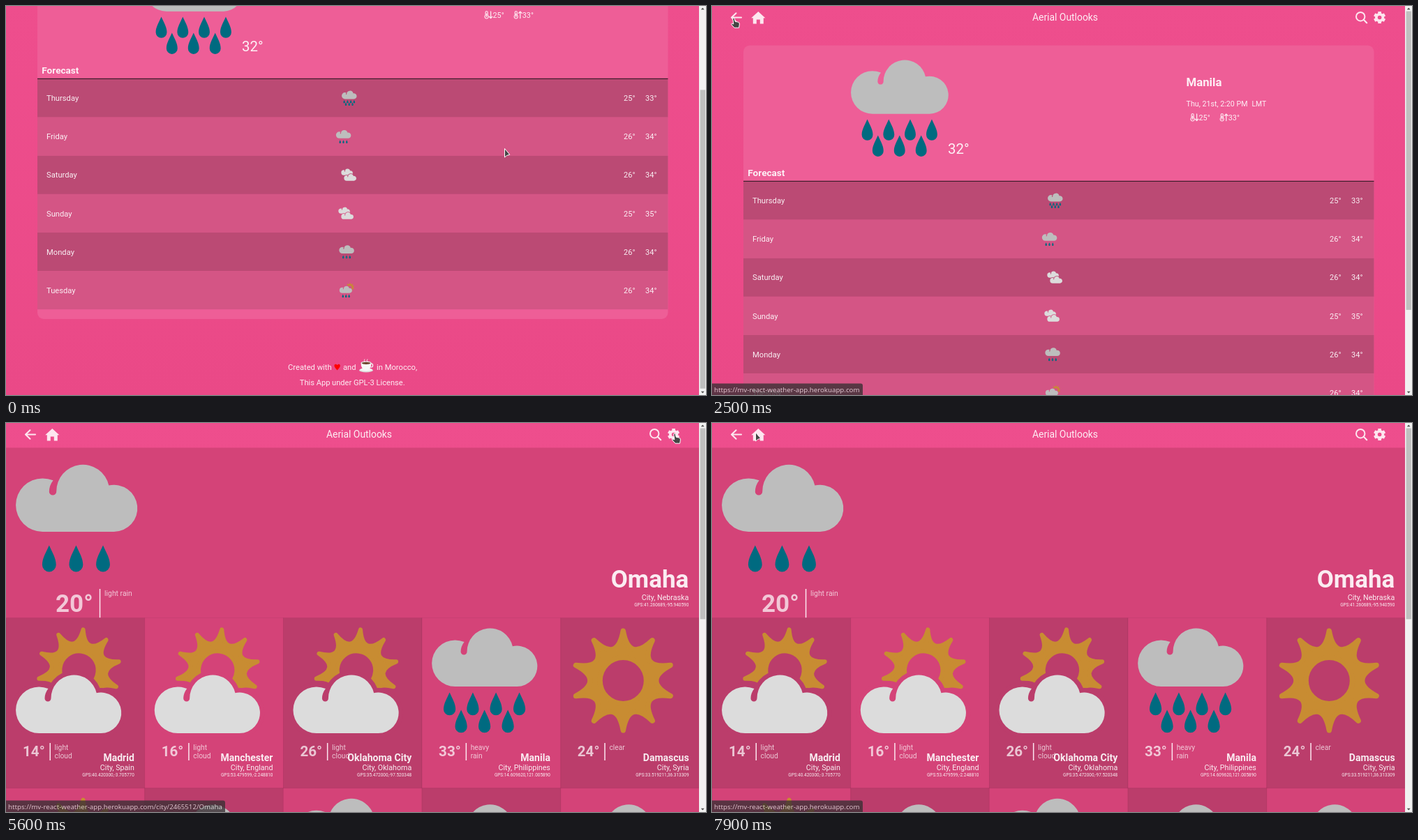
Animation of 1003 by 558 pixels, one loop 8000 ms. Source, as an HTML page:

```html
<!DOCTYPE html>
<html lang="en">
<head>
<meta charset="utf-8">
<title>Weather app</title>
<style>
  html, body { margin: 0; width: 100%; height: 100%; overflow: hidden; background: #ec4b8a; }
  svg { display: block; }
  text { font-family: Roboto, "Open Sans", sans-serif; fill: #fff; fill-opacity: .9; white-space: pre; }
  .bold { font-weight: 700; }
  .soft { fill-opacity: .7; }
  .end { text-anchor: end; }
  .mid { text-anchor: middle; }
  .url { font-family: "Noto Sans", sans-serif; fill: #f2eef0; }
  .line { fill: none; stroke: #fde6ef; stroke-linecap: round; stroke-linejoin: round; }
  .solid { fill: #fde6ef; }
  .pointer { fill: #444; stroke: #fff; stroke-width: 1; stroke-linejoin: round; }
</style>
</head>
<body>
<svg id="stage" width="1003" height="558" viewBox="0 0 1003 558"></svg>
<script>
const GREY = '#bdbdbd', LIGHT = '#dcdcdc', SUN = '#c88c32', RAIN = '#006a80';
const DARK_CELL = '#bb3d6b', LIGHT_CELL = '#d44378';
const LOOP = 8000, STEP = 100, VIEW = 558;

const text = (x, y, size, str, cls = '') =>
  `<text x="${x}" y="${y}" font-size="${size}" class="${cls}">${str}</text>`;
const rect = (x, y, w, h, fill, more = '') =>
  `<rect x="${x}" y="${y}" width="${w}" height="${h}" fill="${fill}" ${more}/>`;
const use = (id, x, y, scale = 1, more = '') =>
  `<use href="#${id}" transform="translate(${x} ${y}) scale(${scale})" ${more}/>`;
const icon = (id, x, y, size) => use(id, x, y, size / 151);

// Weather icons live in a box about 151 units wide.
// Ten rays joined by curved valleys, around a round hole.
function sunPath() {
  const at = (r, turn) => {
    const a = turn * Math.PI / 5;
    return `${(r * Math.sin(a)).toFixed(1)} ${(-r * Math.cos(a)).toFixed(1)}`;
  };
  let d = 'M' + at(71.3, 0);
  for (let i = 0; i < 10; i++) d += `Q${at(27, i + .5)} ${at(71.3, i + 1)}`;
  return d + 'ZM33.2 0A33.2 33.2 0 1 0-33.2 0A33.2 33.2 0 1 0 33.2 0Z';
}
const cloud = (x, y, scale, fill) => use('cloud', x, y, scale, `fill="${fill}"`);
const cutCloud = (x, y, scale, fill) =>
  use('cloud', x, y, scale, 'fill="currentColor" stroke="currentColor" stroke-width="13"') +
  cloud(x, y, scale, fill);
const drops = (y, xs) => xs.map(x => use('drop', x, y)).join('');
const threeDrops = drops(109, [41.5, 75, 108.5]);

const defs = `<defs>
  <path id="cloud" d="M33.3 83.5A33.25 33.25 0 0 1 33.3 17Q40 17 46.5 19.5C43 24 41.5 29 41.5 33.5A4.5 4.5 0 0 0 50.5 33.5A33 33 0 0 1 115.7 25.8A29.2 29.2 0 1 1 122 83.5Z"/>
  <path id="drop" fill="${RAIN}" d="M0 0C4 9 8.6 16 8.6 24.2A8.6 8.6 0 0 1-8.6 24.2C-8.6 16-4 9 0 0Z"/>
  <path id="star" fill="${SUN}" stroke="${SUN}" stroke-width="7.4" stroke-linejoin="round" fill-rule="evenodd" d="${sunPath()}"/>
  <g id="heavyRain">${cloud(0, 0, 1, GREY)}${drops(92, [25.5, 58.8, 92, 125.5])}${drops(117, [42, 75.5, 109])}</g>
  <g id="lightRain">${cloud(0, 8.5, 1, GREY)}${threeDrops}</g>
  <g id="clear">${use('star', 75.5, 75)}</g>
  <g id="lightCloud"><g transform="rotate(6 90.5 60)">${use('star', 90.5, 60, .82)}</g>${cutCloud(0, 67, 1, LIGHT)}</g>
  <g id="heavyCloud">${cloud(0, 12, .77, LIGHT)}${cutCloud(28, 64, .82, LIGHT)}</g>
  <g id="showers">${use('star', 106, 46, .62)}${cutCloud(0, 32, .84, GREY)}${use('drop', 35, 116)}${use('drop', 66, 116)}${use('drop', 97, 116)}</g>
  <g id="thermo"><path class="line" stroke-width="1.2" d="M2.3 6.5V2.2a1.5 1.5 0 0 1 3 0V6.5a2.6 2.6 0 1 1-3 0Z"/><path class="line" stroke-width="1.4" d="M3.8 4.5V8.5"/></g>
  <path id="arrow" class="pointer" d="M.5 .5V13L3.6 10.4 7.8 9.2Z"/>
  <path id="hand" class="pointer" d="M-1.3 .6Q0-.6 1.2 .8L2.2 5.2 6.6 6.2Q8.6 6.8 8.4 9L7.6 14.2H1L-3 9.8Q-3.8 8.2-2.2 8L-.2 9Z"/>
</defs>`;

function header() {
  const teeth = [0, 60, 120].map(a =>
    `<path stroke="#fde6ef" stroke-width="4.6" d="M0-8.5V-4.5M0 4.5V8.5" transform="rotate(${a})"/>`).join('');
  return `<path class="line" stroke-width="2.1" d="M42 16.5H28M34.5 10.3L28 16.5L34.5 22.7"/>
    <path class="solid" d="M66.3 8L76.4 17.2H73.8V25.5H68.8V19.5H63.8V25.5H58.8V17.2H56.2Z"/>
    ${text(506, 21.3, 13.9, 'Aerial Outlooks', 'mid')}
    <circle class="line" stroke-width="2" cx="929.2" cy="15.2" r="6.2"/>
    <path class="line" stroke-width="2.2" d="M933.8 19.8L938.2 24.2"/>
    <g transform="translate(956.6 16.5)"><circle r="4.7" fill="none" stroke="#fde6ef" stroke-width="3.8"/>${teeth}</g>`;
}

function forecastRow([day, id, iconX, low, high], i) {
  const top = 251.6 + i * 55.1, bg = i % 2 ? '#d45585' : '#bb4a74', base = top + 31.6;
  return `<g color="${bg}">${rect(45, top, 903.5, 55.1, bg)}
    ${text(58, base, 11.2, day)}${icon(id, iconX, top + 17, 21.5)}
    ${text(901.5, base, 11, low + '°', 'end')}${text(932.5, base, 11, high + '°', 'end')}</g>`;
}

function detailPage() {
  const rows = [
    ['Thursday', 'heavyRain', 481, 25, 33],
    ['Friday', 'lightRain', 472.8, 26, 34],
    ['Saturday', 'heavyCloud', 480.3, 26, 34],
    ['Sunday', 'heavyCloud', 476.3, 25, 35],
    ['Monday', 'lightRain', 477.3, 26, 34],
    ['Tuesday', 'showers', 477.8, 26, 34]
  ];
  const cup = `<g transform="translate(516 663.5)">
    <ellipse cy="6" rx="10" ry="3" fill="#d9d9d9"/><ellipse cy="5.2" rx="9" ry="2.2" fill="#f4f4f4"/>
    <circle cx="7" cy="-1" r="2.6" fill="none" stroke="#eee" stroke-width="1.4"/>
    <path fill="#f7f7f7" d="M-7.5-4.5H7.5Q7.5 5.5 0 5.5T-7.5-4.5Z"/>
    <ellipse cy="-4.5" rx="7.5" ry="2.4" fill="#e4e4e4"/><ellipse cy="-4.2" rx="6.2" ry="1.6" fill="#70432c"/>
    <path fill="none" stroke="#eee" stroke-width=".9" d="M-2-6q-1.5-2 0-4M2-6q-1.5-2 0-4"/></g>`;
  return header() + rect(45, 56.5, 903.5, 539.5, '#ee5e97', 'rx="9"') +
    icon('heavyRain', 199, 77.5, 139.5) + text(338, 211.6, 20.4, '32°') +
    text(679.5, 115.3, 16.8, 'Manila', 'bold') +
    text(679.5, 144, 10.7, 'Thu, 21st, 2:20 PM') + text(773.5, 144, 10.4, 'LMT') +
    use('thermo', 684.8, 153.8) + '<path class="line" stroke-width="1.3" d="M694.6 155V164.5M692.4 162.2L694.6 164.5L696.8 162.2"/>' +
    use('thermo', 727, 153.8) + '<path class="line" stroke-width="1.3" d="M736.8 164.5V155M734.6 157.2L736.8 155L739 157.2"/>' +
    text(697.5, 163.8, 10.8, '25°') + text(739.8, 163.8, 10.8, '33°') +
    text(51.3, 244, 13.6, 'Forecast', 'bold') +
    rows.map(forecastRow).join('') + rect(45, 250.8, 903.5, 1, '#1a1015') +
    text(404, 669, 11.2, 'Created with') +
    '<path fill="#f00" d="M474.6 669.5C472.5 666.8 470.4 665.2 470.4 663A2.15 2.15 0 0 1 474.6 662.2A2.15 2.15 0 0 1 478.8 663C478.8 665.2 476.7 666.8 474.6 669.5Z"/>' +
    text(483, 669, 11.2, 'and') + cup + text(531, 669, 11.2, 'in Morocco,') +
    text(496.2, 691, 11.1, 'This App under GPL-3 License.', 'mid');
}

function place(right, base, [name, region, gps], nameSize) {
  return text(right, base, nameSize, name, 'bold end') +
    text(right, base + (nameSize > 20 ? 18.2 : 13.4), 10.7, 'City, ' + region, 'end') +
    text(right, base + (nameSize > 20 ? 27.1 : 22), 6.45, 'GPS:' + gps, 'end');
}

function cell([id, temp, words, spot], i) {
  const x = i % 5 * 198.7, y = 279.5 + Math.floor(i / 5) * 244.3;
  const bg = i % 2 ? LIGHT_CELL : DARK_CELL;
  // Cells alternate along the whole list, so the second row starts light.
  return `<g transform="translate(${x} ${y})" color="${bg}">
    ${rect(0, 0, 198.7, 244.3, bg, 'stroke="#000" stroke-opacity=".07"')}
    ${icon(id, 14, 15, 151)}
    ${temp ? text(24, 198.8, 20.6, temp + '°', 'bold soft') : ''}
    ${rect(62.5, 179.5, 1.5, 25, '#fde6ef')}
    ${words.split(' ').map((w, k) => text(69.6, 189.3 + 12 * k, 10.3, w, 'soft')).join('')}
    ${spot ? place(183.8, 205.4, spot, 14) : ''}</g>`;
}

function homePage() {
  const cells = [
    ['lightCloud', 14, 'light cloud', ['Madrid', 'Spain', '40.420300,-3.705770']],
    ['lightCloud', 16, 'light cloud', ['Manchester', 'England', '53.479599,-2.248810']],
    ['lightCloud', 26, 'light cloud', ['Oklahoma City', 'Oklahoma', '35.472000,-97.520348']],
    ['heavyRain', 33, 'heavy rain', ['Manila', 'Philippines', '14.609620,121.005890']],
    ['clear', 24, 'clear', ['Damascus', 'Syria', '33.519211,36.313309']],
    ['lightCloud', 0, 'light cloud'],
    ['lightRain', 0, 'light rain'],
    ['heavyRain', 0, 'heavy rain'],
    ['lightRain', 0, 'light rain'],
    ['lightRain', 0, 'light rain']
  ];
  return header() + rect(0, 35.5, 993, 244, LIGHT_CELL) +
    icon('lightRain', 14, 50, 174) +
    text(71, 271, 35, '20°', 'bold soft') + rect(133.8, 238, 1.5, 41.5, '#fde6ef') +
    text(141, 247.5, 10.4, 'light rain', 'soft') +
    place(978.3, 235.6, ['Omaha', 'Nebraska', '41.260689,-95.940590'], 35) +
    cells.map(cell).join('');
}

document.getElementById('stage').innerHTML = defs +
  '<linearGradient id="sky" x2="0" y2="1"><stop stop-color="#ee4e8d"/><stop offset="1" stop-color="#ea4987"/></linearGradient>' +
  rect(0, 0, 1003, VIEW, 'url(#sky)') +
  `<g id="detail">${detailPage()}</g><g id="home">${homePage()}</g>
  <g id="tip"><path id="tipBox" fill="#3b3035"/>${text(3, 553.6, 9.68, '', 'url')}</g>
  ${rect(993, 0, 10, VIEW, '#f1f1f1')}${rect(994.6, 8, 7.4, 10, '#bfbfbf', 'id="thumb"')}
  <path fill="#505050" d="M998.2 2.4L1000.6 5.2H995.8ZM998.2 555.6L1000.6 552.8H995.8Z"/>
  <use id="pointer"/>`;

const $ = id => document.getElementById(id);
const tipText = $('tip').querySelector('text');
const HOST = 'https://mv-react-weather-app.herokuapp.com';

// Pointer path: time, x, y.
const path = [
  [0, 714, 204], [1300, 714, 204], [1500, 640, 184], [1900, 185, 62], [2200, 38, 18],
  [2300, 31, 17], [3200, 31, 17], [3300, 30, 16], [3400, 30, 16], [3500, 52, 19],
  [3600, 52, 19], [3900, 330, 40], [4200, 809, 56], [4500, 937, 46], [4600, 943, 46],
  [5100, 943, 46], [5400, 958, 15], [6900, 958, 15], [7300, 600, 37], [7800, 58, 11],
  [7900, 62, 13], [8000, 62, 13]
];
function pointerAt(t) {
  const i = path.findIndex(p => p[0] > t);
  const [t0, x0, y0] = path[i - 1], [t1, x1, y1] = path[i], k = (t - t0) / (t1 - t0);
  return [x0 + (x1 - x0) * k, y0 + (y1 - y0) * k];
}

// Share of a wheel scroll still to go, one value per step.
const remaining = [.93, .735, .47, .16, 0];
function scrollAt(t, start, from) {
  const i = Math.floor((t - start) / STEP);
  return i < 0 ? from : Math.round(from * remaining[Math.min(i, 4)]);
}

function tipAt(t) {
  if (t >= 7900) return ['', .8];
  if (t >= 6100 || t < 2100) return ['', 0];
  if (t >= 3000) return ['/city/2465512/Omaha', t < 5600 ? 1 : .8];
  return ['', t >= 2200 && t < 2500 ? 1 : .8];
}

function draw(now) {
  const t = Math.floor(now % LOOP / STEP) * STEP;
  const atHome = t >= 3000;
  const scroll = atHome ? scrollAt(t, 4600, 148) : scrollAt(t, 300, 147);
  const page = $(atHome ? 'home' : 'detail'), height = atHome ? 1104 : 706;
  $('home').style.display = atHome ? '' : 'none';
  $('detail').style.display = atHome ? 'none' : '';
  page.setAttribute('transform', `translate(0 ${-scroll})`);
  $('thumb').setAttribute('y', 7.5 + scroll * 542 / height);
  $('thumb').setAttribute('height', 542 * VIEW / height);

  const [route, opacity] = tipAt(t), width = route ? 314 : 216;
  tipText.textContent = HOST + route;
  $('tipBox').setAttribute('d', `M0 541.5H${width - 3}Q${width} 541.5 ${width} 544.5V558H0Z`);
  $('tip').setAttribute('opacity', opacity);

  const [x, y] = pointerAt(t);
  $('pointer').setAttribute('href', t >= 2100 && t < 7000 ? '#hand' : '#arrow');
  $('pointer').setAttribute('transform', `translate(${x.toFixed(1)} ${y.toFixed(1)})`);
}

function tick() {
  draw(performance.now());
  requestAnimationFrame(tick);
}
tick();
</script>
</body>
</html>
```
